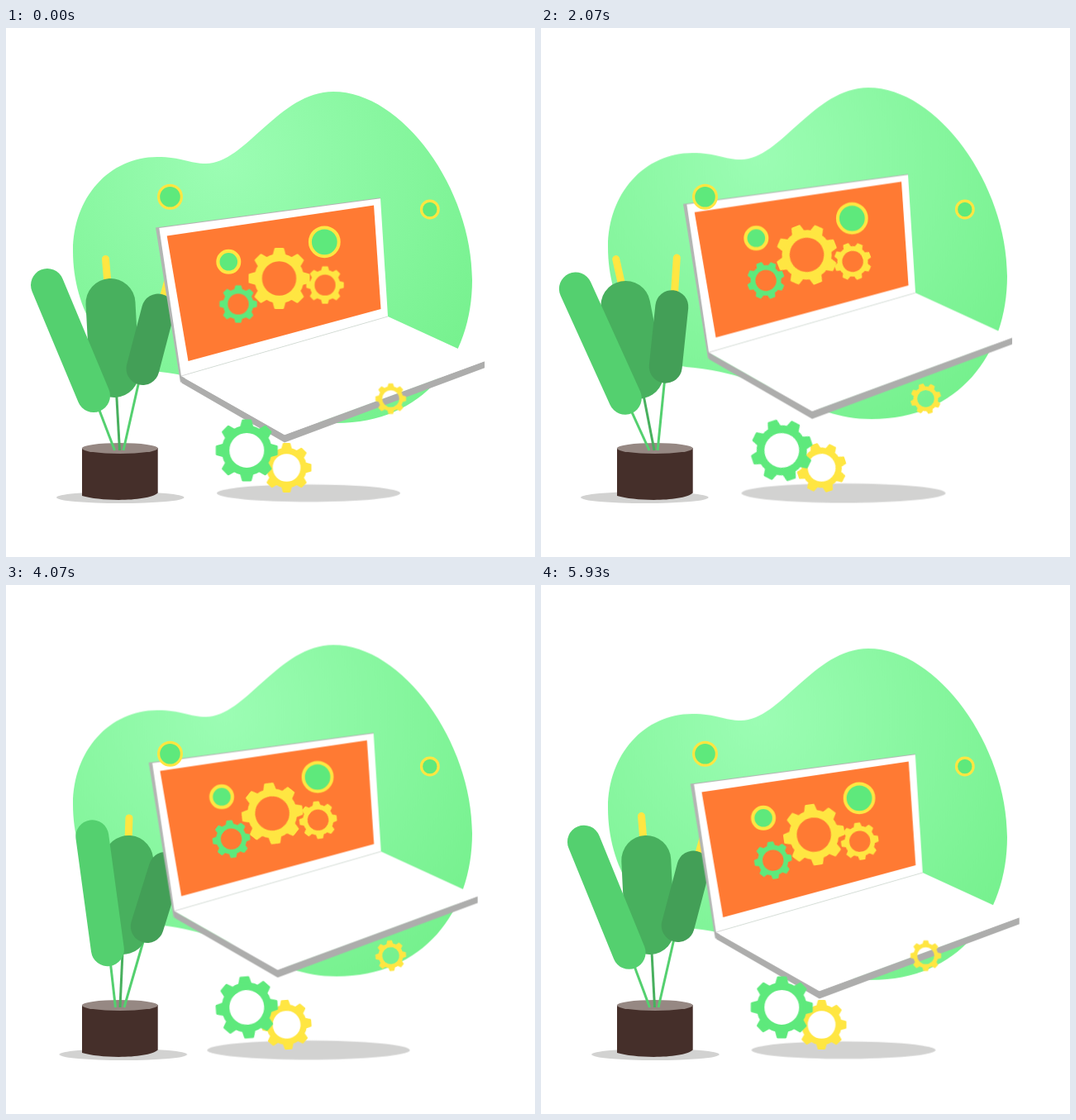
These frames come from a looping animation (640 by 640 pixels, 6 s). An HTML page:

```html
<!DOCTYPE html>
<html lang="en">
<head>
<meta charset="utf-8">
<title>Laptop and gears</title>
<style>
  html, body { margin: 0; width: 100%; height: 100%; overflow: hidden; background: #fff; }
  svg { display: block; width: 100%; height: 100%; }

  .float, .blob, .spin, .turn, .floor, .pot-shadow, .limb { animation: 6s linear infinite; }
  .float { animation-name: float; }
  .blob { animation-name: lift; }
  .spin { animation-name: spin; }
  .turn { animation-name: turn; animation-timing-function: cubic-bezier(.3333, 0, .6667, 1); }
  .floor { animation-name: widen; }
  .pot-shadow { animation-name: drift; }

  @keyframes float { 50% { transform: translate(-13px, -41.4px); } }
  @keyframes lift { 50% { transform: translateY(-7px); } }
  @keyframes spin { from { transform: rotate(0deg); } to { transform: rotate(720deg); } }
  @keyframes turn { from { transform: rotate(0deg); } to { transform: rotate(-720deg); } }
  @keyframes widen { from, to { transform: scale(1); } 50% { transform: scale(1.163); } }
  @keyframes drift { 30% { transform: translateX(-15.1px); } 70% { transform: translateX(4.6px); } }

  /* plant: each part is a thick line whose ends move */
  .limb { fill: none; stroke-linecap: round; }
  .stem { stroke-width: 3; stroke-linecap: butt; }
  .stick { stroke-width: 9; stroke: #ffe642; }
  .light { stroke: #54d06f; }
  .mid { stroke: #48b05e; }
  .dark { stroke: #439f57; }

  #stemL { animation-name: stemL; }
  @keyframes stemL {
    0%, 100% { d: path("M131.5 511L112 460"); }
    33.33% { d: path("M131 511L107 460"); }
    66.67% { d: path("M132.5 511L127 458"); }
  }
  #stemM { animation-name: stemM; }
  @keyframes stemM {
    0%, 100% { d: path("M137.5 511L133.5 440"); }
    33.33% { d: path("M137 511L122.5 440"); }
    66.67% { d: path("M138 511L141.5 440"); }
  }
  #stemR { animation-name: stemR; }
  @keyframes stemR {
    0%, 100% { d: path("M142 511L161 427"); }
    33.33% { d: path("M141 511L149 425"); }
    66.67% { d: path("M143 511L167.5 427"); }
  }
  #stickM { animation-name: stickM; }
  @keyframes stickM {
    0%, 100% { d: path("M120.5 279.5L124 320"); }
    33.33% { d: path("M88.5 279.5L98 320"); }
    66.67% { d: path("M150 282L148.5 320"); }
  }
  #stickR { animation-name: stickR; }
  @keyframes stickR {
    0%, 100% { d: path("M203 280L190.5 325"); }
    33.33% { d: path("M162.5 278L160 322"); }
    66.67% { d: path("M212.5 280L200 326"); }
  }
  #leafM { animation-name: leafM; }
  @keyframes leafM {
    0%, 100% { d: path("M126.5 333L131 417"); }
    33.33% { d: path("M100.6 336L117.5 418.5"); }
    66.67% { d: path("M149 333L141.5 417"); }
  }
  #leafR { animation-name: leafR; }
  @keyframes leafR {
    0%, 100% { d: path("M184 341.5L165.5 412"); }
    33.33% { d: path("M157 337L150 409.5"); }
    66.67% { d: path("M193 343L171 413"); }
  }
  #leafL { animation-name: leafL; }
  @keyframes leafL {
    0%, 100% { d: path("M50 311L106 445"); }
    33.33% { d: path("M39.5 316L101 448"); }
    66.67% { d: path("M106.3 304L123.5 441"); }
  }

  .yellow { color: #ffe642; }
  .green { color: #5ee97c; }
  .ring { fill: #5ee97c; stroke: #ffe642; }
</style>
</head>
<body>
<svg viewBox="0 0 640 640">
  <defs>
    <radialGradient id="mint" gradientUnits="userSpaceOnUse" cx="265" cy="160" r="370">
      <stop offset="0" stop-color="#9cfdb4"/>
      <stop offset="1" stop-color="#76f18e"/>
    </radialGradient>
    <path id="tooth" d="M-.12-.96H.12L.18-.74H-.18Z" fill="currentColor"
          stroke="currentColor" stroke-width=".08" stroke-linejoin="round"/>
    <g id="pair">
      <use href="#tooth"/>
      <use href="#tooth" transform="rotate(180)"/>
    </g>
    <g id="gear">
      <circle r=".685" fill="none" stroke="currentColor" stroke-width=".25"/>
      <use href="#pair"/>
      <use href="#pair" transform="rotate(45)"/>
      <use href="#pair" transform="rotate(90)"/>
      <use href="#pair" transform="rotate(135)"/>
    </g>
  </defs>

  <path class="blob" fill="url(#mint)" d="M81 270C81 205 125 156 183 156C212 156 222 164 242 164
    C290 164 330 77 396 77C480 77 564 195 564 305C564 400 505 478 400 478
    C320 478 290 425 176 415C120 405 81 340 81 270Z"/>

  <g transform="translate(366 562.7)">
    <ellipse class="floor" rx="111" ry="10.5" fill="#d2d2d1"/>
  </g>

  <g id="plant">
    <ellipse class="pot-shadow" cx="138.3" cy="568" rx="77.2" ry="7" fill="#d2d2d1"/>
    <path fill="#452f2a" d="M92 508H183.7V562.5C172 573 115 573 92 566Z"/>
    <ellipse cx="137.8" cy="508.5" rx="46" ry="6.5" fill="#968883"/>
    <path id="stemL" class="limb stem light" d="M131.5 511L112 460"/>
    <path id="stemM" class="limb stem mid" d="M137.5 511L133.5 440"/>
    <path id="stemR" class="limb stem light" d="M142 511L161 427"/>
    <path id="stickM" class="limb stick" d="M120.5 279.5L124 320"/>
    <path id="stickR" class="limb stick" d="M203 280L190.5 325"/>
    <path id="leafM" class="limb mid" stroke-width="60" d="M126.5 333L131 417"/>
    <path id="leafR" class="limb dark" stroke-width="40" d="M184 341.5L165.5 412"/>
    <path id="leafL" class="limb light" stroke-width="40" d="M50 311L106 445"/>
  </g>

  <g class="float">
    <path fill="#b3b5b3" d="M181 241.5L453 205.2V210L216 424L211 429Z"/>
    <path fill="#adadac" d="M210.5 420.5L337 492L579 403V411.3L337 501.5L212.5 429.5Z"/>
    <path fill="#fff" d="M212 421L462 349L579 402.7V403.2L337 492.3Z"/>
    <path fill="#fff" d="M185.3 242L453 206.3L462 349L212 421Z"/>
    <path fill="none" stroke="#d4d4d4" stroke-width=".8" d="M212 421L462 349"/>
    <path fill="#ff7a33" d="M194.7 251.5L445 214.5L453.5 340L220.5 403Z"/>
    <g class="yellow" transform="translate(330.5 303) scale(37)"><use class="spin" href="#gear"/></g>
    <g class="yellow" transform="translate(386 311) scale(22.7)"><use class="spin" href="#gear"/></g>
    <g class="green" transform="translate(281 334) scale(22.7)"><use class="spin" href="#gear"/></g>
    <circle class="ring" cx="269.3" cy="282.8" r="12.9" stroke-width="4.2"/>
    <circle class="ring" cx="385.3" cy="258.8" r="17.4" stroke-width="4"/>
  </g>

  <circle class="ring" cx="198.5" cy="204.3" r="13.9" stroke-width="3.2"/>
  <circle class="ring" cx="512.8" cy="219.5" r="10.3" stroke-width="3.2"/>

  <g class="yellow" transform="translate(339.5 532) scale(30)"><use class="turn" href="#gear"/></g>
  <g class="green" transform="translate(291.3 511) scale(37.5)"><use class="turn" href="#gear"/></g>
  <g class="yellow" transform="translate(465.5 448.5) scale(18.5)"><use class="turn" href="#gear"/></g>
</svg>
</body>
</html>
```
